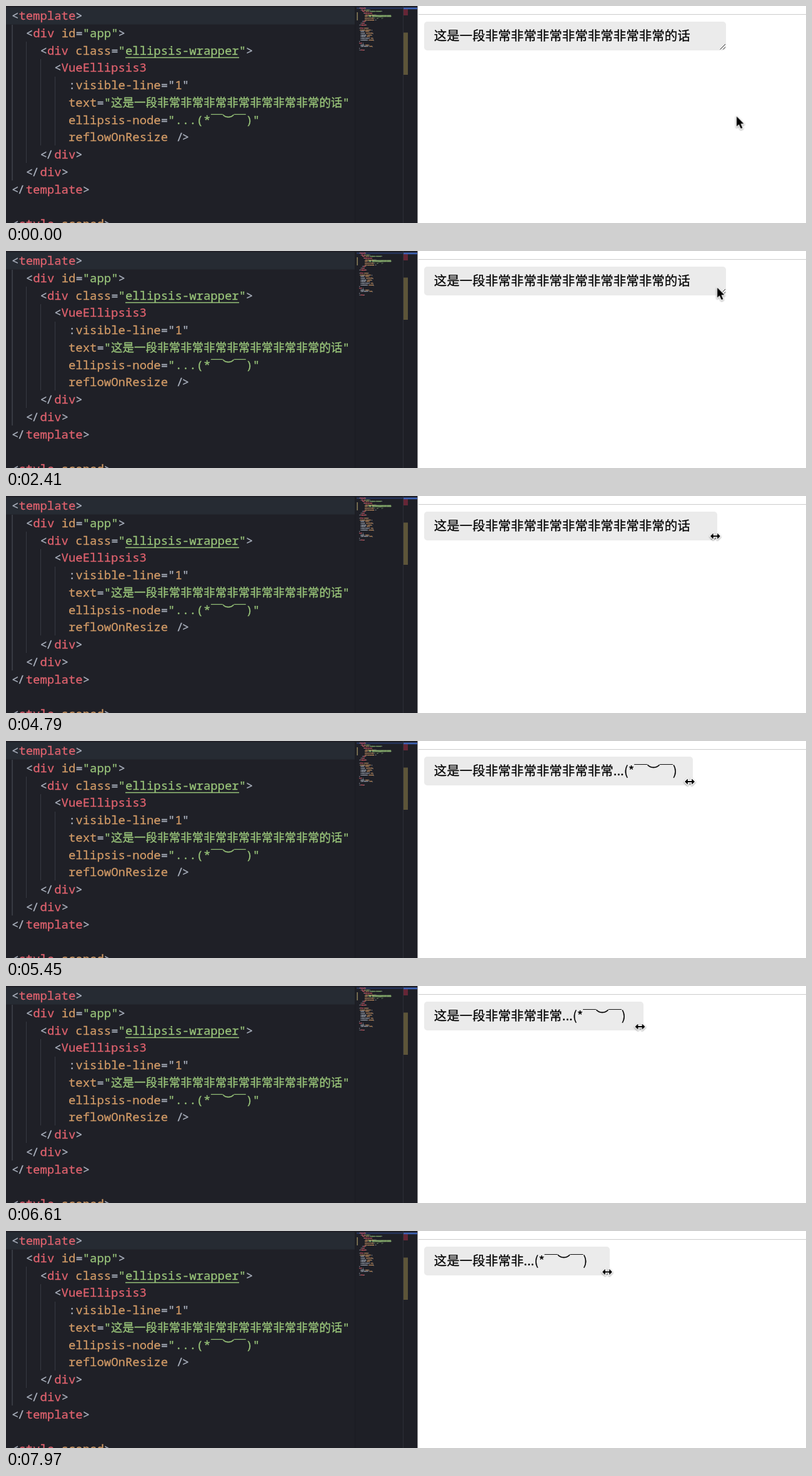
Write an HTML page that moves like this. It is 1280 by 347 pixels and loops after 8000 ms.

```html
<!DOCTYPE html>
<html lang="zh-CN">
<head>
<meta charset="utf-8">
<title>Ellipsis demo</title>
<style>
html, body { margin: 0; width: 100%; height: 100%; overflow: hidden; background: #fff; }
#stage { position: relative; width: 1280px; height: 347px; overflow: hidden; }
#editor { position: absolute; left: 0; top: 0; stroke-width: .3px; }
#editor text {
  white-space: pre; font: 18.95px "Noto Sans Mono", "Noto Sans CJK SC", monospace;
  color: #abb2bf; fill: currentColor; stroke: currentColor;
}
#editor tspan { fill: currentColor; stroke: currentColor; }
#editor .t { color: #e0626e; }
#editor .a { color: #d19a66; }
#editor .s { color: #98c379; }
#editor .cjk { font: 18.52px "Noto Sans CJK SC", "Noto Sans CJK JP", sans-serif; }
#minimap { stroke-width: 3px; }

#rule { position: absolute; left: 660px; right: 0; top: 13px; height: 1px; background: #cbcbcb; }
#box {
  position: absolute; left: 669px; top: 24.5px; width: 482.5px; height: 46.5px;
  border-radius: 5px; background: #ebebeb; overflow: hidden;
  animation: shrink 8s linear infinite;
}
#label {
  position: absolute; left: 15.7px; top: -2px; white-space: nowrap; color: #000;
  font: 20.5px/46.5px "Noto Sans CJK SC", "Noto Sans CJK JP", sans-serif;
  -webkit-text-stroke: .25px #000;
}
#grip { position: absolute; right: 0; bottom: 0; }
#cursor { position: absolute; left: 0; top: 0; animation: move 8s linear infinite; }
#cursor svg { position: absolute; left: -20px; top: -20px; filter: drop-shadow(0 1px 1px #0006); }
#cursor path { stroke: #fff; stroke-width: 2.8; stroke-linejoin: round; paint-order: stroke; }
#arrow { animation: arrow 8s step-end infinite; }
#sizer { animation: sizer 8s step-end infinite; }

@keyframes shrink {
  0%, 52.625% { width: 482.5px; }
  62.875% { width: 464px; }
  68.125% { width: 430px; }
  72.125% { width: 413px; }
  82.625% { width: 351.5px; }
  93.125% { width: 300px; }
  94.625%, 100% { width: 296.5px; }
}
@keyframes move {
  0%, .375% { transform: translate(1168.5px, 175.5px); animation-timing-function: ease-in-out; }
  8.625% { transform: translate(1140.5px, 80.5px); }
  10.375% { transform: translate(1140.5px, 77px); }
  19.625% { transform: translate(1138.5px, 61px); }
  30.125%, 31.375% { transform: translate(1137.5px, 57.5px); }
  34.5% { transform: translate(1144px, 61px); }
  40.375%, 42.375% { transform: translate(1149px, 63px); }
  44.125%, 52.625% { transform: translate(1149px, 63.5px); }
  62.875% { transform: translate(1129px, 64.5px); }
  68.125% { transform: translate(1094px, 65px); }
  72.125% { transform: translate(1077px, 65px); }
  82.625% { transform: translate(1014.5px, 65px); }
  93.125% { transform: translate(965.5px, 65.5px); }
  94.625%, 100% { transform: translate(962px, 65.5px); }
}
@keyframes arrow { 0% { opacity: 1; } 34.5%, 100% { opacity: 0; } }
@keyframes sizer { 0% { opacity: 0; } 34.5%, 100% { opacity: 1; } }
</style>
</head>
<body>
<div id="stage">
  <svg id="editor" width="660" height="347">
    <rect width="658" height="347" fill="#1f2027"/>
    <rect y="2" width="558" height="27.5" fill="#262b33"/>
    <path d="M10 30V279" stroke="#50545f" stroke-width="1"/>
    <path d="M32.5 57V251M55.5 85V223M78.5 113V223" stroke="#363942" stroke-width="1"/>
    <path d="M191 82.5H373" stroke="#98c379" stroke-width="1.3"/>

    <g id="code">
      <text x="9" y="22">&lt;<tspan class="t">template</tspan>&gt;</text>
      <text x="31.8" y="49.8">&lt;<tspan class="t">div</tspan> <tspan class="a">id</tspan>=<tspan class="s">"app"</tspan>&gt;</text>
      <text x="54.5" y="77.5">&lt;<tspan class="t">div</tspan> <tspan class="a">class</tspan>=<tspan class="s">"ellipsis-wrapper"</tspan>&gt;</text>
      <text x="77.2" y="105.3">&lt;<tspan class="t">VueEllipsis3</tspan></text>
      <text x="100" y="133">:<tspan class="a">visible-line</tspan>="<tspan class="a">1</tspan>"</text>
      <text x="100" y="160.8"><tspan class="a">text</tspan>=<tspan class="s">"</tspan><tspan class="s cjk" x="168">这是一段非常非常非常非常非常非常非常的话</tspan><tspan class="s" x="538.5">"</tspan></text>
      <text x="100" y="188.5"><tspan class="a">ellipsis-node</tspan>=<tspan class="s">"...(*</tspan><tspan class="s cjk" x="328">￣︶￣</tspan><tspan class="s" x="383.5">)"</tspan></text>
      <text x="100" y="216.3"><tspan class="a">reflowOnResize</tspan> <tspan dx="2">/</tspan><tspan dx="-2">&gt;</tspan></text>
      <text x="54.5" y="244">&lt;<tspan dx="-2">/</tspan><tspan class="t" dx="2">div</tspan>&gt;</text>
      <text x="31.8" y="271.8">&lt;<tspan dx="-2">/</tspan><tspan class="t" dx="2">div</tspan>&gt;</text>
      <text x="9" y="299.5">&lt;<tspan dx="-2">/</tspan><tspan class="t" dx="2">template</tspan>&gt;</text>
      <text x="9" y="355">&lt;<tspan class="t">style</tspan> <tspan class="a">scoped</tspan>&gt;</text>
      <text x="9" y="382.8"><tspan class="a">.ellipsis-wrapper</tspan> {</text>
      <text x="31.8" y="410.5">width: <tspan class="a">480px</tspan>;</text>
      <text x="31.8" y="438.3">resize: <tspan class="a">horizontal</tspan>;</text>
      <text x="31.8" y="466">overflow: <tspan class="a">hidden</tspan>;</text>
      <text x="31.8" y="493.8">padding: <tspan class="a">10px</tspan>;</text>
      <text x="31.8" y="521.5">border-radius: <tspan class="a">4px</tspan>;</text>
      <text x="31.8" y="549.3">background: <tspan class="a">#ebebeb</tspan>;</text>
      <text x="9" y="577">}</text>
      <text x="9" y="604.8"><tspan class="t">body</tspan> {</text>
      <text x="31.8" y="632.5">width: <tspan class="a">600px</tspan>;</text>
      <text x="31.8" y="660.3">line-height: <tspan class="a">24px</tspan>;</text>
      <text x="9" y="688">}</text>
      <text x="9" y="715.8">&lt;/<tspan class="t">style</tspan>&gt;</text>
    </g>

    <rect x="558" width="100" height="347" fill="#1e1f26"/>
    <path d="M558.5 0V347" stroke="#1a1b21" stroke-width="1"/>
    <rect x="561" y="2.5" width="75" height="2" fill="#2f4a8c" opacity=".6"/>
    <use id="minimap" href="#code" transform="translate(564.5 2) scale(.096)"/>
    <rect x="561.5" y="10" width="1.2" height="13" fill="#a89c6a"/>
    <path d="M635.5 0V347" stroke="#2d2f38" stroke-width="1"/>
    <rect x="636" y="5" width="7" height="10" fill="#652636"/>
    <rect x="636" y="2.5" width="22" height="2.7" fill="#3f62b4"/>
    <rect x="636" y="42.5" width="7" height="67.5" fill="#5d5539"/>
    <rect x="658" width="1" height="347" fill="#8e8e92"/>
  </svg>

  <div id="rule"></div>
  <div id="box">
    <span id="label">这是一段非常非常非常非常非常非常非常的话</span>
    <svg id="grip" width="11" height="11"><path d="M1.5 9.5L10 1M6.3 9.5L10 5.8" stroke="#333" fill="none"/></svg>
  </div>
  <div id="cursor">
    <svg id="arrow" width="44" height="44" viewBox="-20 -20 44 44"><path d="M.5 1V17.2L4.2 13.8L7.2 20.6L9.9 19.4L7 12.8H12Z"/></svg>
    <svg id="sizer" width="40" height="40" viewBox="-20 -20 40 40"><path d="M-8 0L-3.2 -4.8V-1.1H3.2V-4.8L8 0L3.2 4.8V1.1H-3.2V4.8Z"/></svg>
  </div>
</div>
<script>
const box = document.getElementById('box');
const label = document.getElementById('label');
const full = label.textContent;
const tail = '...(*￣︶￣)';
const em = 20.5, pad = 16, tailWidth = 102;

// Keep as many characters as fit on one line ahead of the tail.
function fit(width) {
  const room = width - 2 * pad;
  if (room >= full.length * em) return full;
  return full.slice(0, Math.floor((room - tailWidth) / em)) + tail;
}

function draw() {
  const text = fit(box.getBoundingClientRect().width);
  if (label.textContent !== text) label.textContent = text;
  requestAnimationFrame(draw);
}
draw();
</script>
</body>
</html>
```
